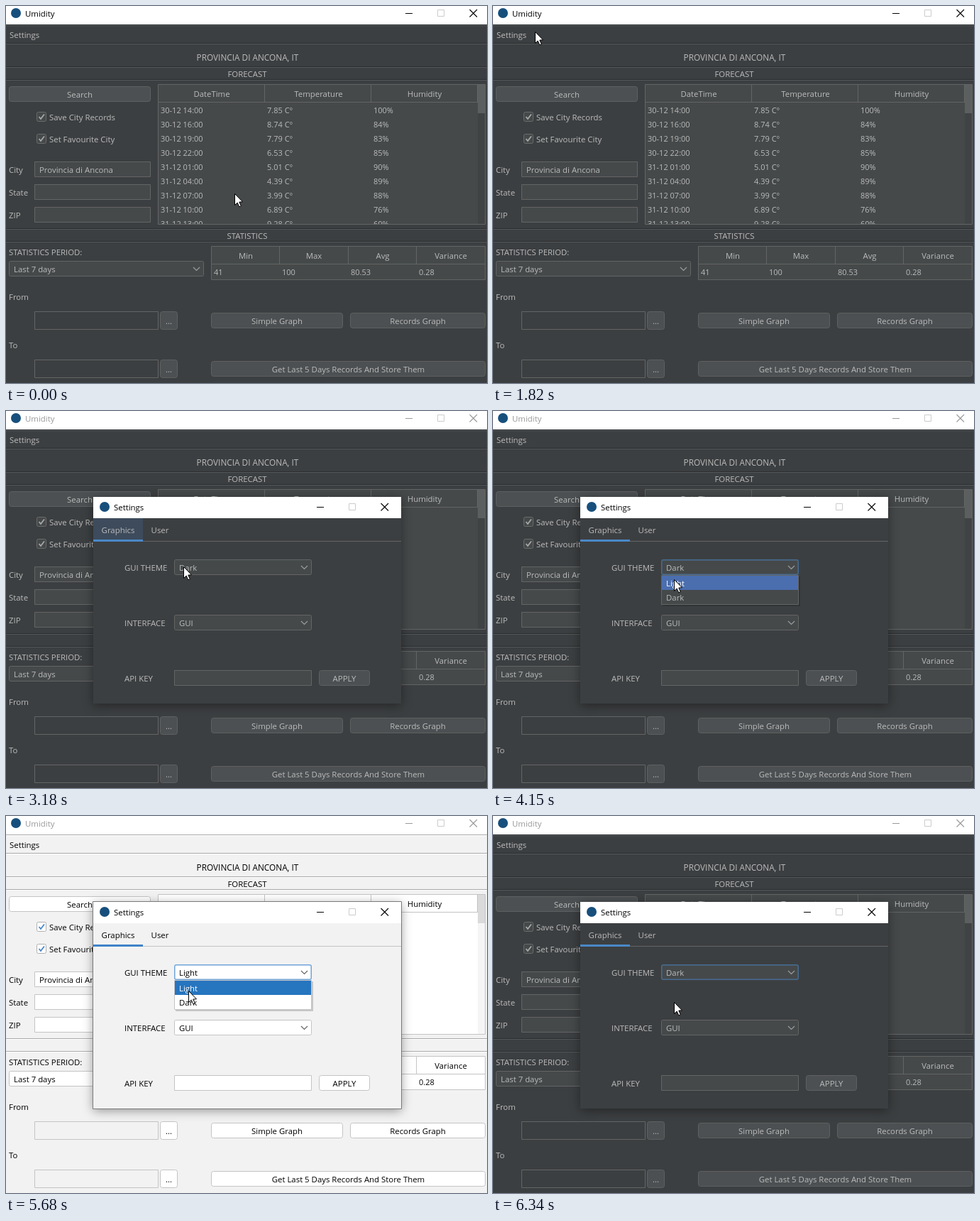
An HTML page with a canvas for the animation above (7.22 s loop, 678x531 px).

```html
<!DOCTYPE html>
<html lang="en">
<head>
<meta charset="utf-8">
<title>Umidity</title>
<style>
html, body { margin: 0; width: 100%; height: 100%; overflow: hidden; background: #3c3f41; }
canvas { display: block; }
</style>
</head>
<body>
<canvas id="stage" width="678" height="531"></canvas>
<script>
const ctx = document.getElementById('stage').getContext('2d');
const LOOP = 7220;

const DARK = {
  bg: '#3c3f41', text: '#bbbbbb', field: '#45494a', border: '#646464', button: '#4c5052',
  buttonBorder: '#5e6060', hover: '#55585a', etchDark: '#2a2c2d', etchLight: '#55595c',
  grid: '#5e6364', track: '#3f4344', thumb: '#5b5f60', check: '#a7a7a7', arrow: '#9a9da1',
  focus: '#466d94', tabFocus: '#3d4b5c', underline: '#4a88c7', select: '#4b6eaf',
  frame: '#3c3f41'
};
const LIGHT = {
  bg: '#f2f2f2', text: '#000000', field: '#ffffff', border: '#c4c4c4', button: '#ffffff',
  buttonBorder: '#c4c4c4', hover: '#f7f7f7', etchDark: '#a9a9a9', etchLight: '#ffffff',
  grid: '#e0e0e0', track: '#f5f5f5', thumb: '#dadada', check: '#4d89c9', arrow: '#666666',
  focus: '#6fa3d8', tabFocus: '#dae4ed', underline: '#4083c9', select: '#2675bf',
  frame: '#7a7a7a'
};

const FORECAST = [
  ['30-12 14:00', '7.85 C°', '100%'],
  ['30-12 16:00', '8.74 C°', '84%'],
  ['30-12 19:00', '7.79 C°', '83%'],
  ['30-12 22:00', '6.53 C°', '85%'],
  ['31-12 01:00', '5.01 C°', '90%'],
  ['31-12 04:00', '4.39 C°', '89%'],
  ['31-12 07:00', '3.99 C°', '88%'],
  ['31-12 10:00', '6.89 C°', '76%'],
  ['31-12 13:00', '9.28 C°', '60%']
];

// Pointer path: time, x, y
const PATH = [
  [0, 322, 264], [900, 322, 264], [1610, 70, 42], [1820, 59, 36], [1960, 50, 24],
  [2150, 43, 36], [2420, 43, 36], [3000, 236, 206], [3180, 250, 219], [3840, 250, 219],
  [4300, 257, 243], [4760, 257, 243], [5000, 257, 216], [5200, 257, 216],
  [5450, 257, 236], [5680, 257, 246], [6140, 255, 262], [LOOP, 255, 262]
];

let theme = DARK;

function pointerAt(t) {
  const i = PATH.findIndex(key => key[0] > t);
  const [t0, x0, y0] = PATH[i - 1], [t1, x1, y1] = PATH[i];
  const p = (t - t0) / (t1 - t0), e = p * p * (3 - 2 * p);
  return { x: Math.round(x0 + (x1 - x0) * e), y: Math.round(y0 + (y1 - y0) * e) };
}

const inside = (p, x0, y0, x1, y1) => p.x >= x0 && p.x < x1 && p.y >= y0 && p.y < y1;

function rect(x0, y0, x1, y1, color) {
  ctx.fillStyle = color;
  ctx.fillRect(x0, y0, x1 - x0, y1 - y0);
}

function box(x0, y0, x1, y1, fill, stroke, radius = 0) {
  ctx.beginPath();
  ctx.roundRect(x0 + .5, y0 + .5, x1 - x0 - 1, y1 - y0 - 1, radius);
  ctx.fillStyle = fill;
  ctx.fill();
  ctx.strokeStyle = stroke;
  ctx.lineWidth = 1;
  ctx.stroke();
}

function text(str, x, y, { align = 'left', size = 11.4, color = theme.text } = {}) {
  ctx.font = `${size}px "Open Sans", "Noto Sans", sans-serif`;
  ctx.textAlign = align;
  ctx.fillStyle = color;
  ctx.fillText(str, x, y);
}

const centered = (str, x, y, size) => text(str, x, y, { align: 'center', size });

function polyline(points, color, width = 1) {
  ctx.beginPath();
  points.forEach(([x, y]) => ctx.lineTo(x, y));
  ctx.strokeStyle = color;
  ctx.lineWidth = width;
  ctx.stroke();
}

function etch(y) {
  rect(0, y, 678, y + 1, theme.etchDark);
  rect(0, y + 1, 678, y + 2, theme.etchLight);
}

function button(label, x0, y0, x1, y1, hovered) {
  box(x0, y0, x1, y1, hovered ? theme.hover : theme.button, theme.buttonBorder, 3);
  centered(label, (x0 + x1) / 2, (y0 + y1) / 2 + 5);
}

function field(x0, y0, x1, y1, value = '', fill = theme.field) {
  box(x0, y0, x1, y1, fill, theme.border);
  text(value, x0 + 7, y0 + 16);
}

function combo(value, x0, y0, x1, y1, focused) {
  box(x0, y0, x1, y1, theme.field, focused ? theme.focus : theme.border, 2);
  if (focused) box(x0 + .5, y0 + .5, x1 - .5, y1 - .5, 'transparent', theme.focus, 2);
  text(value, x0 + 7, y0 + 16);
  const cx = x1 - 10.5, cy = (y0 + y1) / 2;
  polyline([[cx - 4.5, cy - 2], [cx, cy + 2.5], [cx + 4.5, cy - 2]], theme.arrow, 1.2);
}

function checkbox(label, y) {
  box(43, y, 57, y + 14, theme.field, theme === DARK ? '#6b6b6b' : '#b0b0b0', 2);
  polyline([[46.5, y + 7], [49, y + 10], [54, y + 3.5]], theme.check, 1.8);
  text(label, 61, y + 12);
}

function titleBar(label, x0, y0, x1, y1, active) {
  const color = active ? '#000000' : '#999999';
  const cy = y0 + (y1 - y0 > 28 ? 14 : 10);
  rect(x0, y0, x1, y1, '#ffffff');
  ctx.beginPath();
  ctx.arc(x0 + (x0 ? 16 : 14), cy, 7, 0, Math.PI * 2);
  ctx.fillStyle = '#174f7c';
  ctx.fill();
  text(label, x0 + (x0 ? 29 : 27), cy + 5, { color });
  const right = x1 - (x0 ? 18 : 14);
  rect(right - 101, cy, right - 91, cy + 1, color);
  box(right - 56, cy - 5, right - 46, cy + 5, '#ffffff', '#cccccc');
  polyline([[right - 10.5, cy - 5], [right, cy + 5.5]], color, 1.1);
  polyline([[right, cy - 5], [right - 10.5, cy + 5.5]], color, 1.1);
}

function forecastTable() {
  box(214, 110, 676, 308, theme.field, theme.border);
  rect(665, 111, 675, 307, theme.track);
  rect(665, 111, 675, 151, theme.thumb);
  rect(215, 135, 665, 136, theme.border);
  [364, 514, 664].forEach(x => rect(x, 111, x + 1, 135, theme.border));
  centered('DateTime', 290, 128);
  centered('Temperature', 440.5, 128);
  centered('Humidity', 590, 128);
  ctx.save();
  ctx.beginPath();
  ctx.rect(215, 136, 450, 171);
  ctx.clip();
  FORECAST.forEach((row, r) =>
    row.forEach((cell, c) => text(cell, 218 + 150 * c, 151 + 20 * r, { size: 11 })));
  ctx.restore();
}

function statsTable() {
  const heads = ['Min', 'Max', 'Avg', 'Variance'], values = ['41', '100', '80.53', '0.28'];
  box(289, 338, 676, 386, theme.field, theme.border);
  rect(290, 363, 675, 364, theme.border);
  heads.forEach((head, i) => {
    const x = 289 + Math.round(96.4 * i);
    if (i) rect(x, 339, x + 1, 363, theme.border);
    centered(head, x + 49, 356);
    text(values[i], x + 4, 379, { size: 11 });
  });
}

function mainWindow(t, pointer) {
  const free = t < 2300;
  rect(0, 26, 678, 531, theme.bg);
  titleBar('Umidity', 0, 0, 678, 26, free);
  etch(26);
  if (t < 2500 && inside(pointer, 2, 30, 51, 52)) rect(2, 30, 50, 51, theme.button);
  text('Settings', 5, 45);
  [52, 85, 103, 313, 331].forEach(etch);
  centered('PROVINCIA DI ANCONA, IT', 340.5, 77, 11.8);
  centered('FORECAST', 340, 100);
  centered('STATISTICS', 340, 328);

  button('Search', 4, 113, 204, 135, free && inside(pointer, 4, 113, 204, 135));
  checkbox('Save City Records', 149);
  checkbox('Set Favourite City', 180);
  ['City', 'State', 'ZIP'].forEach((label, i) => {
    text(label, 4, 235 + 32 * i);
    field(40, 219 + 32 * i, 204, 241 + 32 * i, i ? '' : 'Provincia di Ancona');
  });
  forecastTable();

  text('STATISTICS PERIOD:', 4, 351);
  combo('Last 7 days', 4, 359, 279, 381);
  statsTable();
  ['From', 'To'].forEach((label, i) => {
    const y = 430 + 68 * i;
    text(label, 4, y - 16);
    field(40, y, 215, y + 26, '', theme.bg);
    button('...', 217, y, 242, y + 26);
  });
  button('Simple Graph', 289, 432, 475, 454);
  button('Records Graph', 485, 432, 676, 454);
  button('Get Last 5 Days Records And Store Them', 289, 500, 676, 522);
}

function popup(selected) {
  rect(239, 233, 433, 275, 'rgba(0,0,0,.18)');
  box(237, 231, 431, 273, theme.field, theme.border);
  ['Light', 'Dark'].forEach((item, i) => {
    const y = 232 + 20 * i, chosen = item === selected;
    if (chosen) rect(238, y, 430, y + 20, theme.select);
    text(item, 244, y + 15, { color: chosen ? '#ffffff' : theme.text });
  });
}

function settingsDialog(t, pointer) {
  const grow = Math.min(1, (t - 2300) / 200);
  const focused = t >= 3280;
  const value = theme === DARK ? 'Dark' : 'Light';
  ctx.save();
  ctx.globalAlpha = grow;
  ctx.translate(123, 121);
  ctx.scale(.953 + .047 * grow, .953 + .047 * grow);
  ctx.translate(-123, -121);

  if (grow === 1) {
    ctx.shadowColor = 'rgba(0,0,0,.4)';
    ctx.shadowBlur = 14;
    ctx.shadowOffsetY = 3;
  }
  rect(123, 121, 557, 412, theme.bg);
  ctx.shadowColor = 'transparent';
  titleBar('Settings', 123, 121, 557, 151, true);
  if (theme === LIGHT) box(122, 120, 558, 413, 'transparent', theme.frame);

  if (!focused) rect(123, 151, 193, 183, theme.tabFocus);
  rect(123, 183, 557, 184, theme.border);
  rect(123, 181, 193, 184, theme.underline);
  centered('Graphics', 158, 172);
  centered('User', 217, 172);

  text('GUI THEME', 167, 225);
  combo(value, 237, 209, 431, 231, focused);
  text('INTERFACE', 167, 303);
  combo('GUI', 237, 287, 431, 309);
  text('API KEY', 167, 381);
  field(237, 365, 431, 387);
  button('APPLY', 441, 365, 513, 387);

  const open = (t >= 3360 && t < 4380) || (t >= 5100 && t < 6240);
  if (open) popup(pointer.y < 232 ? value : pointer.y < 252 ? 'Light' : 'Dark');
  ctx.restore();
}

function drawPointer({ x, y }) {
  const shape = [[0, 0], [0, 16], [3.7, 12.6], [6.3, 18.3], [8.8, 17.2], [6.3, 11.6], [11, 11.3]];
  ctx.beginPath();
  shape.forEach(([dx, dy]) => ctx.lineTo(x + .5 + dx, y + .5 + dy));
  ctx.closePath();
  ctx.fillStyle = '#ffffff';
  ctx.fill();
  ctx.strokeStyle = '#000000';
  ctx.lineWidth = 1;
  ctx.stroke();
}

function draw(t) {
  const pointer = pointerAt(t);
  theme = t >= 4430 && t < 6340 ? LIGHT : DARK;
  mainWindow(t, pointer);
  if (t >= 2300) settingsDialog(t, pointer);
  drawPointer(pointer);
}

const start = performance.now();
function tick() {
  draw((performance.now() - start) % LOOP);
  requestAnimationFrame(tick);
}
tick();
</script>
</body>
</html>
```
